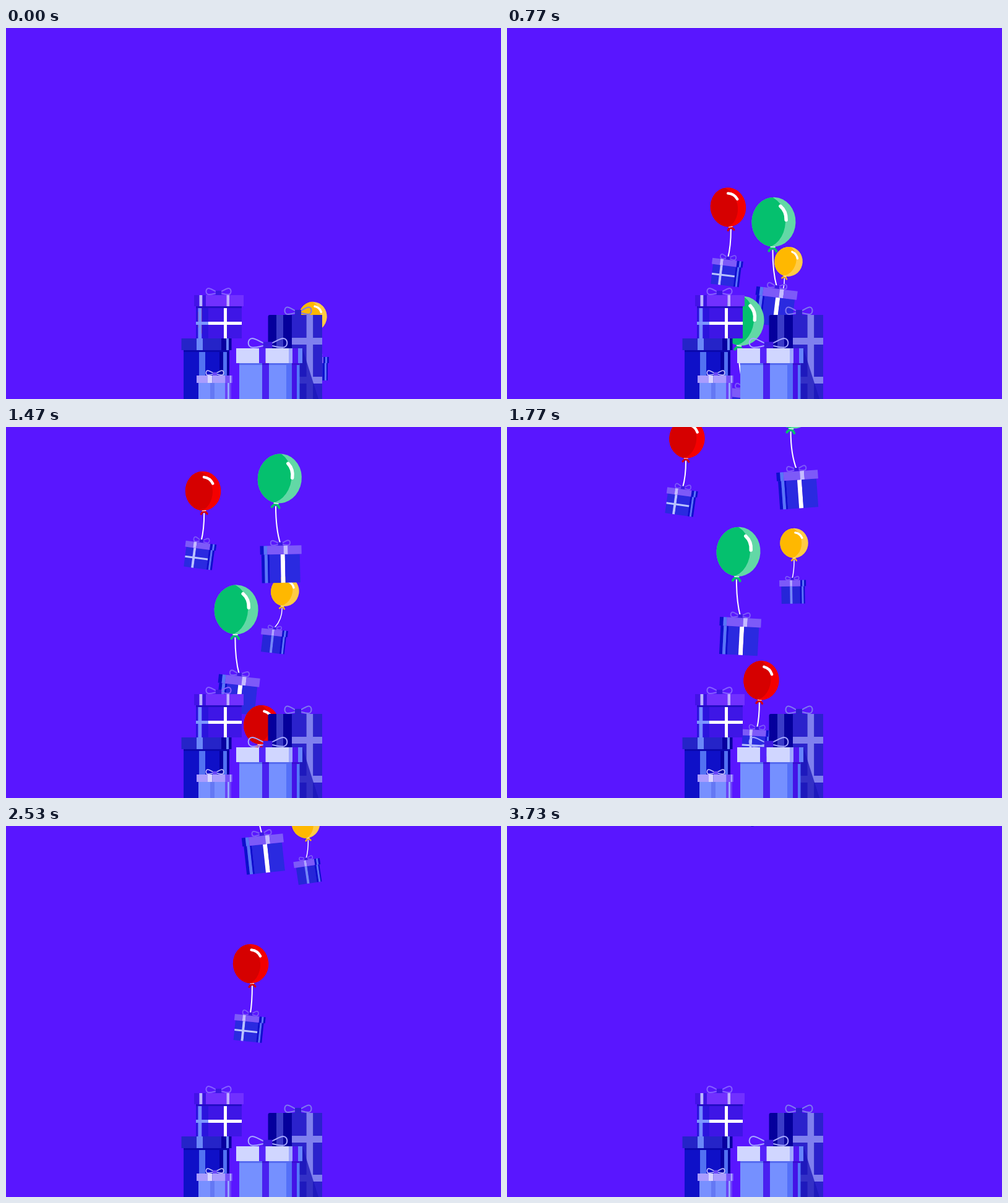
Write an HTML page that moves like this. It is 800x600 px and loops after 3760 ms.

```html
<!DOCTYPE html>
<html lang="en">
<head>
<meta charset="utf-8">
<title>Gifts and balloons</title>
<style>
html, body { margin: 0; width: 100%; height: 100%; overflow: hidden; background: #5916ff; }
svg { display: block; width: 800px; height: 600px; }
</style>
</head>
<body>
<svg id="stage" viewBox="0 0 800 600"></svg>
<script>
const LOOP = 3760;
const stage = document.getElementById('stage');

// A row of touching bars: x0, colour, x1, colour, x2 ...
const bars = (y, h, ...s) => {
  let out = '';
  for (let i = 0; i + 2 < s.length; i += 2)
    out += `<rect x="${s[i]}" y="${y}" width="${s[i + 2] - s[i]}" height="${h}" fill="${s[i + 1]}"/>`;
  return out;
};

const bow = (x, y, w, h, line, knot, width = 2) => {
  const loop = k => `M0 ${-.35 * h}C${k * .45 * w} ${-.7 * h} ${k * .6 * w} ${-h} ${k * .78 * w} ${-h}` +
    `C${k * 1.05 * w} ${-h} ${k * 1.05 * w} ${-.08 * h} ${k * .75 * w} ${-.08 * h}` +
    `C${k * .5 * w} ${-.08 * h} ${k * .3 * w} ${-.25 * h} 0 ${-.35 * h}`;
  return `<g transform="translate(${x} ${y})"><path d="${loop(-1)}${loop(1)}" fill="none" stroke="${line}" stroke-width="${width}"/>
    <rect x="${-.23 * w}" y="${-.65 * h}" width="${.46 * w}" height="${.65 * h}" fill="${knot}"/></g>`;
};

const pile = () =>
  // striped tall box
  bow(472, 464, 22, 12.5, '#7f79ee', '#2b20cc') +
  '<rect x="423.5" y="464" width="87.5" height="140" rx="3" fill="#05009c"/>' +
  bars(464, 136, 437, '#3a3bc8', 448, '#05009c', 462, '#2b22cc', 485.5, '#7f80ee', 496.5, '#2b22cc', 511) +
  bars(501, 11, 462, '#7f80ee', 511) + bars(564, 11, 462, '#7f80ee', 511) +
  '<path d="M474 518h5l26 82h-31z" fill="#1a16b8" opacity=".75"/>' +
  // upper left box
  bow(343.5, 432, 20.5, 11, '#8560ff', '#3b18e2') +
  bars(432, 18, 304, '#4313e6', 312.5, '#b9b8ff', 317.5, '#3c14e2', 323, '#7130ff', 356.5, '#c0b0ff', 361, '#7130ff', 384) +
  bars(450, 52, 307, '#2b14dc', 310.5, '#6f8cff', 316.5, '#2b14dc', 327, '#3e16e6', 352, '#fff', 357, '#3e16e6', 381) +
  bars(450, 3, 307, '#240dc6', 381) +
  bars(475, 5, 307, '#7c96ff', 327, '#fff', 381) +
  // lower left box
  bars(521, 79, 287, '#0f10c8', 312, '#5272f2', 322, '#0f10c8', 345, '#0600a0', 351, '#5272f2', 357, '#0600a0', 361) +
  bars(521, 3, 287, '#0a08ac', 361) +
  bars(502, 19, 283.5, '#2524c8', 308, '#6a88f8', 318, '#2524c8', 348, '#0800a0', 356, '#6a88f8', 360, '#0800a0', 364.5) +
  // small front box
  bow(337.5, 562, 14.5, 8, '#c9c4ff', '#6a48f8', 1.6) +
  bars(574, 26, 311, '#7890ff', 330, '#6478f4', 337, '#7890ff', 354, '#6a44f8', 358, '#92a6ff', 361, '#6a44f8', 364) +
  bars(562, 12, 308, '#a99cff', 326, '#d8d4ff', 333.5, '#a99cff', 354.5, '#7650fa', 361.5, '#a9a4ff', 364, '#7650fa', 366) +
  // large front box
  bow(423, 518, 32, 16, '#a5a8ff', '#3f1ae4') +
  bars(542, 58, 377, '#7590ff', 414, '#4a20f0', 425, '#7590ff', 453, '#5470f8', 462, '#4413e6', 470, '#5478fa', 474.5) +
  bars(542, 3, 377, '#566cf0', 414, '#3d14dc', 425, '#566cf0', 462, '#3a0ed4', 474.5) +
  bars(518, 24, 372, '#d0d6ff', 409, '#5422fa', 419.5, '#d0d6ff', 457, '#9da6ff', 463, '#5018f2', 472, '#6684fc', 479);

const lilac = '#7d5af8', navy = '#0d10cc', sheen = '#5876f6', blue = '#2a2ae0';

const boxes = {
  green: bow(0, 0, 16, 8.5, lilac, '#3b18e2') +
    bars(14, 46, -31, navy, -26, sheen, -21, navy, -18, blue, 0, '#fff', 7, blue, 31) +
    bars(0, 14, -33, navy, -27, sheen, -21.5, lilac, 5, '#c4baff', 12, lilac, 34),
  red: bow(0, 0, 13, 8, lilac, '#3b18e2', 1.7) +
    bars(10, 32, -23, blue, -11, '#b8c4ff', -7, blue, 14, navy, 17, sheen, 20, navy, 23) +
    bars(24, 3, -23, '#b8c4ff', 14) +
    bars(0, 10, -25, lilac, -12, '#c4baff', -7, lilac, 15, navy, 19, sheen, 22, navy, 25),
  yellow: bow(0, 0, 11, 6, lilac, '#3b18e2', 1.6) +
    bars(10, 28, -18, '#2626d8', -4, '#7288f6', 0, '#2626d8', 12, navy, 15, sheen, 18, navy, 20) +
    bars(0, 10, -21, lilac, -4, '#b0a6ff', 0, lilac, 13, navy, 16, sheen, 19, navy, 22)
};

const low = 'M3-28Q15-26 20-14', high = 'M10-26Q20-18 20-4';
const skins = {
  green: { main: '#05c06e', light: '#62d8a6', size: 1, squash: 1, shine: high },
  red: { main: '#d60000', light: '#f40000', size: .81, squash: .98, shine: low },
  yellow: { main: '#ffb800', light: '#ffcb45', size: .64, squash: .94, shine: low }
};

const balloon = s => `<g transform="scale(${s.size} ${s.size * s.squash})">
  <path d="M-6 47Q-3 42 0 42Q3 42 6 47" fill="none" stroke="${s.main}" stroke-width="4" stroke-linecap="round"/>
  <path d="M-4 40H4" stroke="#fff" stroke-width="2.5"/>
  <ellipse rx="35.5" ry="40" fill="${s.light}"/>
  <ellipse cx="-14" rx="33" ry="42" fill="${s.main}" clip-path="url(#ball)"/>
  <path d="${s.shine}" fill="none" stroke="#fff" stroke-width="5.5" stroke-linecap="round"/></g>`;

// Rows: time, balloon x, y, tilt, box x, y, tilt
const paths = {
  green: [
    [-600, 466, 655, 4, 456, 768, 4],
    [0, 460, 506, 7, 452, 617, 6],
    [170, 439, 463, 7, 443, 574, 7],
    [570, 431, 366, 3, 434, 474, 7],
    [770, 431, 314, 2, 436, 422, 7],
    [1170, 433, 191, 4, 436, 298, 3],
    [1570, 447, 46, 9, 448, 155, -2.5],
    [1770, 464, -37, 7, 468, 72, -4],
    [2120, 472, -185, 2, 475, -74, -9]],
  yellow: [
    [0, 496, 467, 4, 500, 532, 0],
    [770, 455, 378, 14, 441, 440, 8],
    [1170, 442, 336, 18, 414, 399, 12],
    [1770, 464, 188, 0, 461, 248, -1],
    [2170, 480, 90, -9, 481, 149, -9],
    [2800, 486, -75, -6, 486, -15, -6],
    [3000, 486, -125, 0, 486, -65, 0]],
  redA: [
    [0, 337, 472, 0, 335, 557, 0],
    [530, 354, 347, -4, 352, 432, 5],
    [770, 357.5, 290, -7, 357, 375, 7],
    [1170, 344, 185, -8, 345, 270, 7],
    [1770, 291, 19, 3, 284, 101, 8],
    [2170, 262, -108, 4, 257, -27, 8],
    [2450, 250, -200, 0, 248, -118, 4]],
  redB: [
    [1100, 416, 570, 5, 410, 653, 0],
    [1770, 411, 410, 5, 404, 490, 3],
    [2170, 413, 312, -3, 412, 396, 5],
    [2970, 368, 112, -2, 366, 195, 7],
    [3230, 345, 38, 2, 342, 121, 8],
    [3730, 341, -132, 2, 340, -49, 6]]
};

// Smooth curve through the rows, resting at both ends
const slope = (rows, i, c) => {
  const a = rows[Math.max(0, i - 1)], b = rows[Math.min(rows.length - 1, i + 1)];
  return (b[c] - a[c]) / (b[0] - a[0]);
};
const pose = (rows, t) => {
  const last = rows.length - 1;
  if (t <= rows[0][0]) return rows[0];
  if (t >= rows[last][0]) return rows[last];
  let i = 0;
  while (rows[i + 1][0] <= t) i++;
  const a = rows[i], b = rows[i + 1], d = b[0] - a[0], u = (t - a[0]) / d, v = 1 - u;
  return a.map((p, c) => c === 0 ? t :
    v * v * (1 + 2 * u) * p + u * v * v * d * slope(rows, i, c) +
    u * u * (3 - 2 * u) * b[c] - u * u * v * d * slope(rows, i + 1, c));
};

// Back to front
const flyers = [
  { kind: 'yellow', rows: paths.yellow },
  { kind: 'red', rows: paths.redA },
  { kind: 'green', rows: paths.green },
  { kind: 'green', rows: paths.green, delay: 600, dx: -59, dy: 11 },
  { kind: 'red', rows: paths.redB }
];

stage.innerHTML = '<clipPath id="ball"><ellipse rx="35.5" ry="40"/></clipPath>' +
  flyers.map(f => `<g class="flyer"><path fill="none" stroke="#fff" stroke-width="${f.kind === 'yellow' ? 1.5 : 2}"/>
    <g>${boxes[f.kind]}</g><g>${balloon(skins[f.kind])}</g></g>`).join('') + pile();

document.querySelectorAll('.flyer').forEach((g, i) => {
  [flyers[i].string, flyers[i].box, flyers[i].ball] = g.children;
});

const place = (el, x, y, r) => el.setAttribute('transform', `translate(${x} ${y}) rotate(${r})`);

const draw = t => {
  for (const { kind, rows, delay = 0, dx = 0, dy = 0, string, box, ball } of flyers) {
    const [, x, y, r, bx, by, br] = pose(rows, t - delay);
    const s = skins[kind], len = 45 * s.size * s.squash, a = r * Math.PI / 180;
    const kx = x - len * Math.sin(a), ky = y + len * Math.cos(a), ey = by - 3;
    place(ball, x + dx, y + dy, r);
    place(box, bx + dx, by + dy, br);
    string.setAttribute('d', `M${kx} ${ky}Q${kx} ${ky + .6 * (ey - ky)} ${bx} ${ey}`);
    string.setAttribute('transform', `translate(${dx} ${dy})`);
  }
};

const start = performance.now();
const tick = () => {
  draw((performance.now() - start) % LOOP);
  requestAnimationFrame(tick);
};
tick();
</script>
</body>
</html>
```
